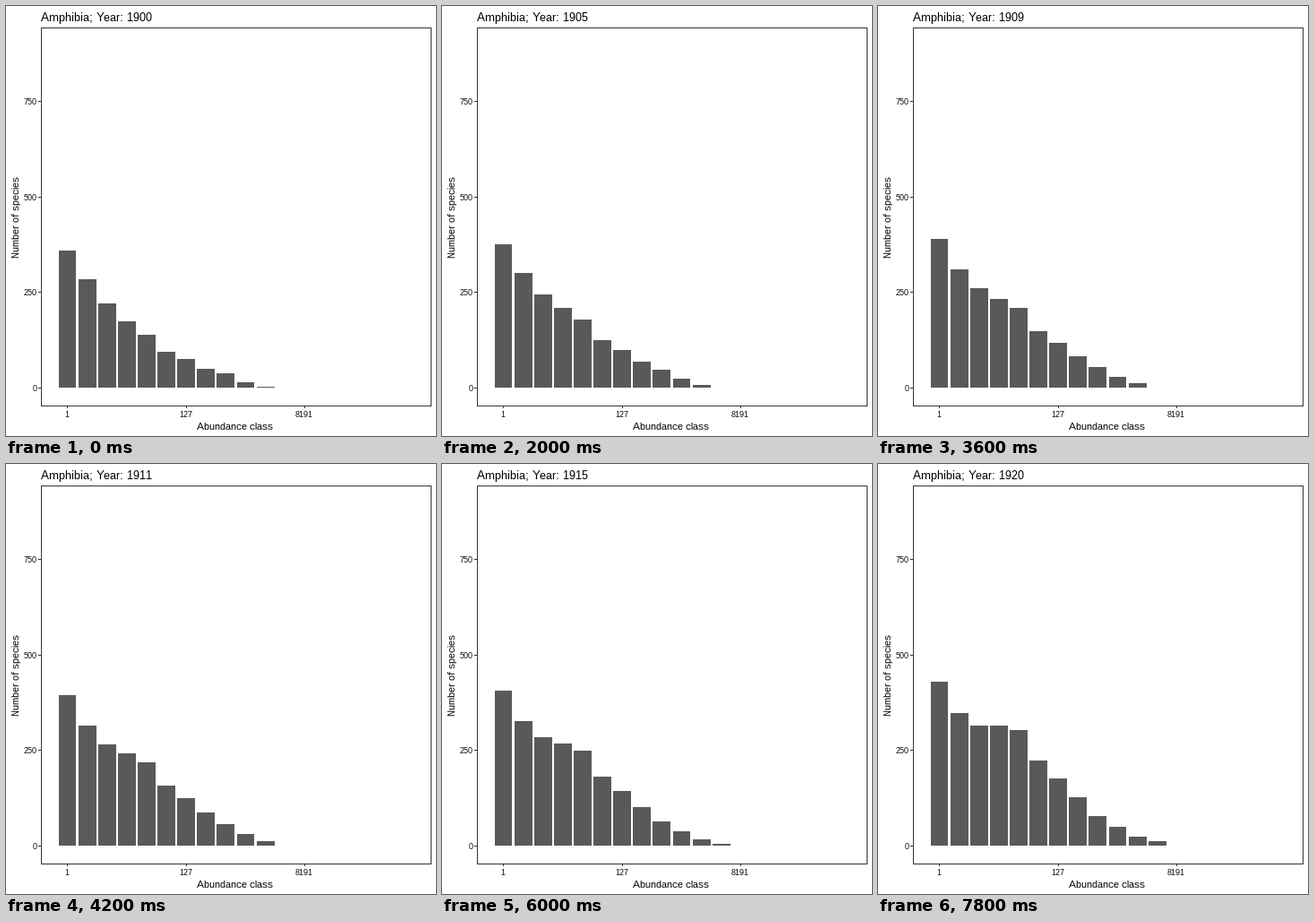
Animation, 480 px wide and 480 px high, one loop 8000 ms. Source, as a matplotlib script:

```python
import numpy as np
import matplotlib.pyplot as plt
from matplotlib.animation import FuncAnimation
from matplotlib.patches import Rectangle

SIZE, DPI = 480, 80
FRAMES, INTERVAL = 40, 200
BASE = 426
FIRST, STEP, HALF = 68.5, 22.115, 9.953
LINE, FILL = "#333333", "#595959"

# Bar heights in pixels in 1900 and 1920; a negative start delays a bar
START = np.array([153, 121, 94, 74, 59, 40, 32, 21, 16, 6, 1, -4])
END = np.array([183, 148, 134, 134, 129, 95, 75, 54, 33, 21, 10, 5])

plt.rcParams.update({"font.family": "Liberation Sans",
                     "text.hinting": "native",
                     "text.hinting_factor": 1})
fig = plt.figure(figsize=(SIZE / DPI, SIZE / DPI), dpi=DPI, facecolor="white")
ax = fig.add_axes([0, 0, 1, 1])
ax.set_xlim(0, SIZE)
ax.set_ylim(SIZE, 0)
ax.axis("off")


def box(x0, y0, x1, y1, color):
    return ax.add_patch(Rectangle((x0, y0), x1 - x0, y1 - y0, facecolor=color,
                                  linewidth=0, snap=False))


def label(x, y, text, px, **kw):
    return ax.text(x, y, text, fontsize=px * 72 / DPI, color="black",
                   va="baseline", **kw)


def heights(i):
    # Growth slows a little mid-way and speeds up near the end
    grown = np.interp(i, [0, 14, 30, FRAMES - 1], [0, 0.34, 0.67, 1])
    return np.rint(np.maximum(START + grown * (END - START), 0))


bars = []
for k in range(len(START)):
    mid = FIRST + k * STEP
    bars.append(box(round(mid - HALF), BASE, round(mid + HALF), BASE, FILL))

# Panel border
box(39, 24, 475, 25, LINE)
box(39, 446, 475, 447, LINE)
box(39, 24, 40, 447, LINE)
box(474, 24, 475, 447, LINE)

for n in range(4):
    y = round(BASE - n * 106.6)
    box(36, y, 39, y + 1, LINE)
    label(35, y + 4, str(250 * n), 9, ha="right")
for power in (1, 7, 13):
    x = int(FIRST + (power - 1) * STEP)
    box(x, 447, x + 1, 449, LINE)
    label(x, 459, str(2 ** power - 1), 9, ha="center")

label(255.5, 473, "Abundance class", 11, ha="center")
label(15, 235.5, "Number of species", 11, ha="center",
      rotation=90, rotation_mode="anchor")
title = label(39, 17, "", 13, ha="left")


def draw(i):
    title.set_text(f"Amphibia; Year: {1900 + (i + 1) // 2}")
    for bar, h in zip(bars, heights(i)):
        bar.set_y(BASE - h)
        bar.set_height(h)
    return [title, *bars]


anim = FuncAnimation(fig, draw, frames=FRAMES, interval=INTERVAL,
                     init_func=lambda: draw(0), repeat=True, repeat_delay=0)
plt.show()
```
